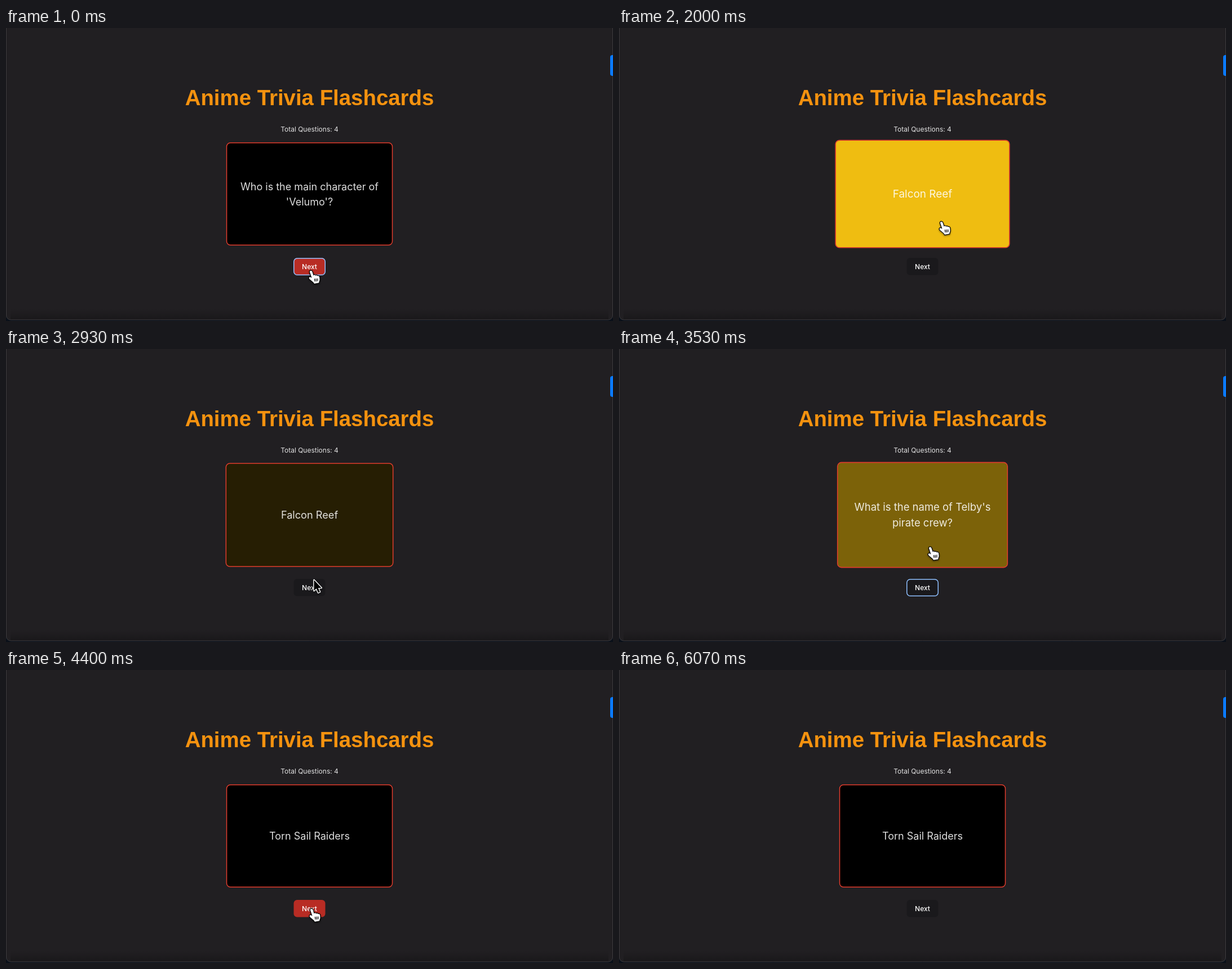
Write an HTML page with a canvas that moves like this. It is 1077 by 520 pixels and loops after 6830 ms.

```html
<!DOCTYPE html>
<html lang="en">
<head>
<meta charset="utf-8">
<title>Flashcards</title>
<style>
  html, body { margin: 0; width: 100%; height: 100%; overflow: hidden; background: #211f22; }
  canvas { display: block; width: 1077px; height: 520px; }
</style>
</head>
<body>
<canvas id="stage" width="1077" height="520"></canvas>
<script>
const ctx = document.getElementById('stage').getContext('2d');
const LOOP = 6830, MOVE = 220;
const MID = 538.5;
const UI = 'Inter, "Open Sans", sans-serif';
const WHITE = 'rgba(255,255,255,.87)';

const card = { x: 390.75, y: 203, w: 295.5, h: 183 };
const button = { x: 510.5, y: 408, w: 56, h: 30.5 };

// Pointer stops: arrival time and place; it rests at each until the next move
const stops = [
  [0, 541, 432], [360, 556, 342], [960, 543, 425], [1820, 572, 345],
  [2476, 561, 405], [2530, 561, 405], [2680, 555, 372], [2910, 545, 407],
  [3150, 542, 425], [3550, 553, 346], [4148, 542, 425], [5160, 577, 312],
  [5910, 690, 560]
];

// Clicks alternate between the button (next question) and the card (answer)
const clicks = [0, 480, 1430, 1980, 3180, 3680, 4600, 5400];
const pirates = [["What is the name of Telby's", 'pirate crew?'], ['Torn Sail Raiders']];
const deck = [
  [['Who is the main character of', "'Velumo'?"], ['Velumo Dakashi']],
  [['Which anime features the', 'character Teno?'], ['Falcon Reef']],
  pirates, pirates
];

const lerp = (a, b, k) => a + (b - a) * k;
const rgb = (a, b, k) => `rgb(${a.map((v, i) => Math.round(lerp(v, b[i], k)))})`;
const inside = (r, [x, y]) => x > r.x && x < r.x + r.w && y > r.y && y < r.y + r.h;

function pointerAt(t) {
  const i = stops.findIndex(s => s[0] > t);
  if (i < 0) return stops[stops.length - 1].slice(1);
  const [t0, x0, y0] = stops[i - 1], [t1, x1, y1] = stops[i];
  const k = Math.max(0, 1 - (t1 - t) / Math.min(MOVE, t1 - t0));
  return [lerp(x0, x1, k), lerp(y0, y1, k)];
}

// Times at which the pointer enters and leaves a box, in turn
function crossings(rect, delay) {
  const times = [];
  let over = inside(rect, pointerAt(0));
  if (over) times.push(-1000);
  for (let t = 0; t < LOOP; t += 2) {
    if (inside(rect, pointerAt(t)) !== over) {
      over = !over;
      times.push(t + delay);
    }
  }
  return times;
}
const cardHover = crossings(card, 0);
const buttonHover = crossings(button, 60);

// cubic-bezier(.25, .1, .25, 1)
function ease(x) {
  if (x <= 0) return 0;
  if (x >= 1) return 1;
  let lo = 0, hi = 1;
  for (let i = 0; i < 18; i++) {
    const u = (lo + hi) / 2;
    if (0.75 * u * (1 - u) + u ** 3 < x) lo = u; else hi = u;
  }
  const u = lo, v = 1 - u;
  return 0.3 * u * v * v + 3 * u * u * v + u ** 3;
}

// Transition value that follows hover changes, also when interrupted
function transition(times, t, duration) {
  let value = 0;
  for (let i = 0; i < times.length && times[i] <= t; i++) {
    const end = Math.min(t, times[i + 1] ?? t);
    value = lerp(value, i % 2 ? 0 : 1, ease((end - times[i]) / duration));
  }
  return value;
}

function box(x, y, w, h, r, fill, stroke, line) {
  ctx.beginPath();
  ctx.roundRect(x, y, w, h, r);
  if (fill) { ctx.fillStyle = fill; ctx.fill(); }
  if (stroke) { ctx.strokeStyle = stroke; ctx.lineWidth = line; ctx.stroke(); }
}

function text(str, x, y, font, color) {
  ctx.font = font;
  ctx.fillStyle = color;
  ctx.fillText(str, x, y);
}

function drawWindow() {
  ctx.fillStyle = '#0a1019';
  ctx.fillRect(0, 0, 1077, 520);
  box(0.5, -20, 1076, 538, 8, '#211f22', '#3c3b3e', 1);
  const shade = ctx.createLinearGradient(0, 498, 0, 517);
  shade.addColorStop(0, 'rgba(0,0,0,0)');
  shade.addColorStop(1, 'rgba(0,0,0,.22)');
  ctx.fillStyle = shade;
  ctx.fillRect(8, 498, 1061, 19);
  box(1072, 48, 12, 37, 4, '#0b7bff');
}

function drawCard(lines, hover) {
  const scale = 1 + 0.05 * hover;
  const { w, h } = card;
  ctx.save();
  ctx.translate(MID, card.y + h / 2);
  ctx.scale(scale, scale);
  box(0.75 - w / 2, 0.75 - h / 2, w - 1.5, h - 1.5, 6.75,
    rgb([0, 0, 0], [239, 189, 17], hover), '#e03c2d', 1.5);
  lines.forEach((line, i) => {
    text(line, 0, 6.5 + (i - (lines.length - 1) / 2) * 27, '18px ' + UI, WHITE);
  });
  ctx.restore();
}

function drawButton(hover, focus) {
  const { x, y, w, h } = button;
  box(x, y, w, h, 6, rgb([26, 25, 28], [184, 44, 36], hover));
  if (focus) box(x + 0.25, y + 0.75, w - 0.5, h - 1, 6, null, '#8fc0ff', 1.5);
  text('Next', MID, 427.6, '500 12px ' + UI, '#fff');
}

const arrow = new Path2D('M1.5 3V22L5.7 18L9 25.3L12 24L8.8 17L14.7 16.8Z');
const hand = new Path2D(
  'M-4 0C-4.5-3 0-3.5 1-.5L3.5 7C5 5.5 7 6 7.5 7.5C9 6.2 11 6.8 11.5 8.3' +
  'C13 7.3 15 8 15.5 10L16 15C16 18 14.5 19 14.5 22L5 23.5' +
  'C4 20-2 17-5 13.5C-6.5 11.5-4.5 9.5-2.5 10.5L0 12Z');
const fingers = new Path2D('M5.6 13.5L6.2 19M8.6 13.2L9 19M11.7 13L11.8 18.6');

function drawPointer(x, y, isHand) {
  const shape = isHand ? hand : arrow;
  ctx.save();
  ctx.translate(x, y);
  if (isHand) {
    ctx.translate(1.5, 1);
    ctx.scale(0.88, 0.88);
  }
  ctx.lineJoin = 'round';
  ctx.shadowColor = 'rgba(0,0,0,.45)';
  ctx.shadowBlur = 3;
  ctx.shadowOffsetY = 1.5;
  ctx.lineWidth = 2.8;
  ctx.strokeStyle = isHand ? '#000' : '#fff';
  ctx.stroke(shape);
  ctx.shadowColor = 'transparent';
  ctx.fillStyle = isHand ? '#fff' : '#000';
  ctx.fill(shape);
  if (isHand) {
    ctx.lineWidth = 1.4;
    ctx.stroke(fingers);
  }
  ctx.restore();
}

function draw(t) {
  const step = clicks.filter(c => c <= t).length - 1;
  const answered = step % 2;
  const tip = pointerAt(t);
  ctx.textAlign = 'center';
  drawWindow();
  text('Anime Trivia Flashcards', MID, 137, 'bold 38.4px "Liberation Sans", Arial, sans-serif', '#f4920f');
  text('Total Questions: 4', MID, 183.5, '12px ' + UI, WHITE);
  drawCard(deck[step >> 1][answered], transition(cardHover, t, 300));
  drawButton(transition(buttonHover, t, 100), !answered);
  drawPointer(...tip, inside(card, tip) || inside(button, tip));
}

const start = performance.now();
function tick() {
  draw((performance.now() - start) % LOOP);
  requestAnimationFrame(tick);
}
draw(0);
requestAnimationFrame(tick);
</script>
</body>
</html>
```
